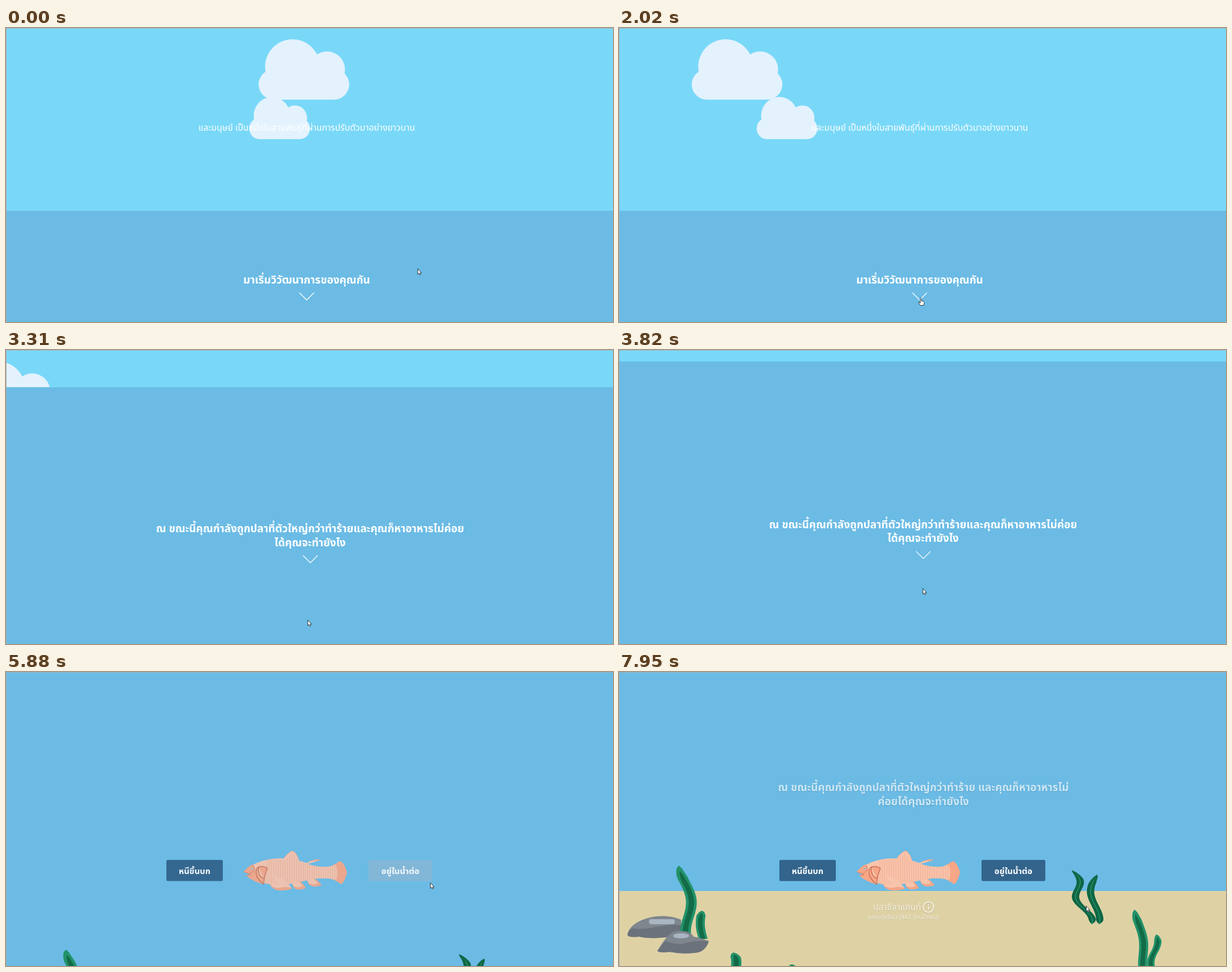
An HTML page for the animation above (8000 ms loop, 1075 px wide and 521 px high).

```html
<!DOCTYPE html>
<html lang="th">
<head>
<meta charset="utf-8">
<title>Evolution scroll story</title>
<style>
  html, body { margin: 0; width: 100%; height: 100%; overflow: hidden; background: #6bbbe5; }
  svg { display: block; width: 1075px; height: 521px; }
  text { font-family: "IBM Plex Sans Thai", "Noto Sans Thai", "Noto Sans", sans-serif; fill: #fff; text-anchor: middle; }
  .head { font-size: 19px; font-weight: 600; }
  .btn { font-size: 14.9px; font-weight: 600; }
  .chevron { fill: none; stroke: #fff; stroke-width: 1.3; }
  .shade { filter: drop-shadow(0 1px 1px #0003); }
</style>
</head>
<body>
<svg viewBox="0 0 1075 521">
  <defs>
    <g id="cloud" fill="#e3f2fd">
      <circle cx="60" cy="-58.5" r="48.5"/>
      <circle cx="121" cy="-53.5" r="32"/>
      <rect y="-54" width="160.5" height="54" rx="27"/>
    </g>
    <pattern id="scales" width="4" height="4" patternUnits="userSpaceOnUse">
      <path d="M3 0Q0 2 3 4" fill="none" stroke="#eda78b" stroke-width=".8"/>
    </pattern>
    <path id="chevron" class="chevron" d="M-13 0L0 13L13 0"/>
  </defs>

  <rect width="1075" height="521" fill="#79d8f8"/>
  <use id="big" href="#cloud"/>
  <use id="small" href="#cloud"/>
  <text x="532.5" y="182" font-size="15.6">และมนุษย์ เป็นหนึ่งในสายพันธุ์ที่ผ่านการปรับตัวมาอย่างยาวนาน</text>

  <rect id="sea" width="1075" height="1000" fill="#6bbbe5"/>
  <g id="title">
    <text class="head" x="532.5" y="453">มาเริ่มวิวัฒนาการของคุณกัน</text>
    <use href="#chevron" x="532.5" y="469"/>
  </g>

  <g id="bed">
    <rect y="405" width="1075" height="400" fill="#ded2a5"/>
    <g id="backRock">
      <path fill="#7f868e" d="M15 482C20 455 75 440 110 456V481Q70 493 35 486Q15 488 15 482Z"/>
      <path fill="#6b727b" d="M15 482Q17 474 24 471C50 477 80 461 110 466V481Q70 493 35 486Q15 488 15 482Z"/>
      <rect x="53" y="455" width="46" height="9" rx="4.5" fill="#a9b5c2"/>
    </g>
    <g id="weeds"></g>
    <g id="frontRock">
      <path fill="#7f868e" d="M68 511Q85 482 97 477Q125 473 132 486Q145 488 159 494Q154 510 140 514Q115 518 90 513Q70 515 68 511Z"/>
      <path fill="#6b727b" d="M68 511L82 494Q105 502 120 497T159 494Q154 510 140 514Q115 518 90 513Q70 515 68 511Z"/>
      <ellipse cx="110" cy="484.5" rx="14" ry="4.5" fill="#a9b5c2"/>
    </g>
  </g>

  <g id="fish">
    <g id="fins"></g>
    <path fill="#f7a686" d="M562 349Q580 343 591 335Q599 337 604 355Q600 372 594 376Q575 364 562 361Z"/>
    <path fill="#f9c4ac" stroke="#f7a686" d="M489 335Q500 318 508 317Q517 322 520 341Z"/>
    <path id="body" fill="#f9c4ac" d="M421 354C450 324 505 325 540 342Q570 349 583 341Q591 355 584 369Q565 361 525 371C490 381 445 378 425 360L433 359Z"/>
    <path fill="url(#scales)" d="M462 333Q500 328 540 342Q570 349 583 341Q591 355 584 369Q565 361 525 371Q490 380 457 376ZM494 333L508 319L518 339Z"/>
    <path fill="#f7a686" d="M421 354Q428 345 436 341Q444 348 445 363L456 376Q437 372 425 360L433 359Z"/>
    <path fill="none" stroke="#d17c60" d="M421 354L434 359L426 361M432 356Q442 355 438 342"/>
    <path fill="#f7a686" stroke="#cc7358" stroke-width="1.5" d="M446 346Q455 342 463 348Q458 358 456 376Q450 372 444 362Q441 351 446 346ZM447 346Q446 362 457 366"/>
    <circle cx="435.5" cy="348.5" r="3" fill="#fff" stroke="#cc7358"/>
    <circle cx="435.5" cy="348.5" r="1.2" fill="#654"/>
  </g>

  <g id="left">
    <rect x="284" y="333" width="100" height="37.5" rx="2.5" fill="#33648c"/>
    <text class="btn" x="334" y="357.5">หนีขึ้นบก</text>
  </g>
  <g id="right">
    <rect id="face" x="642" y="333" width="113" height="37.5" rx="2.5"/>
    <text class="btn" x="698.5" y="357.5">อยู่ในน้ำต่อ</text>
  </g>

  <g id="ask">
    <text class="head" x="538.5" y="272">ณ ขณะนี้คุณกำลังถูกปลาที่ตัวใหญ่กว่าทำร้ายและคุณก็หาอาหารไม่ค่อย</text>
    <text class="head" x="538.5" y="296.5">ได้คุณจะทำยังไง</text>
    <use href="#chevron" x="539" y="313"/>
  </g>
  <g id="again" class="shade">
    <text class="head" x="539" y="211">ณ ขณะนี้คุณกำลังถูกปลาที่ตัวใหญ่กว่าทำร้าย และคุณก็หาอาหารไม่</text>
    <text class="head" x="539" y="235.5">ค่อยได้คุณจะทำยังไง</text>
  </g>
  <g id="label" class="shade">
    <text x="492.5" y="422" font-size="15.4">ปลาซีลาแคนท์</text>
    <circle cx="548" cy="416.5" r="9.3" fill="none" stroke="#fff" stroke-width="2"/>
    <path d="M548 415v6M548 411v2" stroke="#fff" stroke-width="2"/>
    <text x="503.5" y="438" font-size="10.8">ยุคซูลลิเรียน (443 ล้านปีก่อน)</text>
  </g>

  <path d="M0 .5H1075M.5 0V521" stroke="#9fb2bd"/>
  <g id="cursor" fill="#fff" stroke="#222" stroke-width=".9" stroke-linejoin="round">
    <path id="arrow" d="M.5 .5V10.5L2.8 8.4L4.300 11.5L5.8 10.8L4.5 7.8H7Z"/>
    <path id="hand" d="M-.5 1.5Q.5 0 1.5 1.5V5.5L5.5 6.5Q6.5 7 6.5 8.5L5.5 13.5H-.5L-3.5 9Q-3.500 7.5-2 8L-.5 9.5Z"/>
  </g>
</svg>
<script>
  const LOOP = 8000;
  const el = id => document.getElementById(id);
  const clamp = p => Math.min(1, Math.max(0, p));
  const ramp = (t, from, to) => clamp((t - from) / (to - from));
  const smooth = p => p * p * (3 - 2 * p);
  const lerp = (a, b, p) => a + (b - a) * p;
  const move = (id, x, y, more = "") => el(id).setAttribute("transform", `translate(${x} ${y})${more}`);
  const fade = (id, a) => el(id).setAttribute("opacity", a);
  const path = (fill, d) => `<path fill="${fill}" d="${d}"/>`;

  // A ribbon that sways along its height; the tip tapers, and so can the foot.
  function ribbon(fill, w, { x0, y0, x1, y1, sway, waves, phase = 0, foot = false }, inset = 0) {
    const left = [], right = [], steps = 24;
    for (let i = 0; i <= steps; i++) {
      const p = lerp(inset, 1, i / steps), q = i / steps;
      const x = lerp(x0, x1, p) + sway * Math.sin(2 * Math.PI * (waves * p + phase));
      const half = w * Math.sqrt(Math.min(1, q * 6, foot ? (1 - q) * 12 : 1));
      const y = lerp(y0, y1, p).toFixed(1);
      left.push(`${(x - half).toFixed(1)} ${y}`);
      right.unshift(`${(x + half).toFixed(1)} ${y}`);
    }
    return path(fill, `M${left.concat(right).join("L")}Z`);
  }
  const weed = (w, shape) => ribbon("#22926a", w, shape) + ribbon("#136b47", w * .5, shape, .08);
  const kelp = shape => ribbon("#0f6644", 6.5, { ...shape, foot: true }) + ribbon("#2a9a6e", .7, shape, .05);

  el("weeds").innerHTML =
    weed(9.5, { x0: 114, y0: 360, x1: 126, y1: 482, sway: 8, waves: 1, phase: -.25 }) +
    weed(8, { x0: 147, y0: 440, x1: 149, y1: 490, sway: -4, waves: .5 }) +
    weed(8, { x0: 917, y0: 438, x1: 932, y1: 545, sway: 4, waves: 1, phase: -.25 }) +
    weed(6.5, { x0: 952, y0: 482, x1: 944, y1: 545, sway: 4, waves: 1 }) +
    weed(9, { x0: 203, y0: 514, x1: 212, y1: 560, sway: 2, waves: 1 }) +
    weed(7, { x0: 306, y0: 535, x1: 306, y1: 560, sway: 1, waves: 1 }) +
    kelp({ x0: 802, y0: 368, x1: 832, y1: 464, sway: 9, waves: 1.4 }) +
    kelp({ x0: 847, y0: 376, x1: 841, y1: 464, sway: -10, waves: .8 });

  // A leaf-shaped fin from root to tip with a paler core.
  function fin(x, y, dx, dy, w) {
    const leaf = (fill, k) => path(fill, `M${x} ${y}q${dx * .3 * k + w * k} ${dy * .5 * k - w * k} ${dx * k} ${dy * k}q${-dx * .7 * k - w * k} ${w * k} ${-dx * k} ${-dy * k}Z`);
    return leaf("#f7a686", 1) + leaf("#f9c4ac", .75);
  }
  el("fins").innerHTML =
    fin(527, 342, 31, -9, 9) + fin(466, 368, 41, 16, 11) +
    fin(507, 369, 24, 14, 9) + fin(533, 364, 26, 14, 8);
  el("fish").insertAdjacentHTML("beforeend", path("#f9c4ac", "M472 361Q494 365 505 382Q485 382 472 361Z"));

  // Pointer rests: time, x, y.
  const rests = [
    [0, 729, 426], [510, 580, 476], [1170, 534, 478], [3560, 534, 478],
    [4190, 543, 343], [4600, 543, 341], [4740, 575, 350], [5880, 751, 373], [6890, 827, 414],
  ];
  function pointer(t) {
    const i = rests.findIndex(r => r[0] > t);
    if (i < 0) return rests.at(-1).slice(1);
    const [a, b] = [rests[i - 1], rests[i]], p = ramp(t, a[0], b[0]);
    return [lerp(a[1], b[1], p), lerp(a[2], b[2], p)];
  }

  function draw(t) {
    move("big", 447.5 - t * .1577, 127);
    move("small", 431 - t * .0926, 197, " scale(.669 .7)");

    // The sea rises with a decaying scroll, then the question stays pinned for a while.
    const horizon = 372 * Math.exp(-Math.max(0, t - 2130) / 998) - 48;
    move("sea", 0, horizon);
    move("title", 0, horizon - 324);
    fade("title", 1 - ramp(t, 2150, 2650));

    const pinned = 51 - 34 * ramp(t, 3680, 4330) - 17 * ramp(t, 4600, 4740) - .43 * Math.max(0, t - 4740);
    move("ask", 0, pinned + Math.max(0, horizon - 66));
    fade("ask", ramp(t, 2400, 2900));

    move("bed", 0, 177.5 - 194.5 * smooth(ramp(t, 5250, 7250)));

    fade("fish", ramp(t, 4690, 6000));
    fade("left", ramp(t, 4740, 5940));
    fade("right", ramp(t, 4740, 5940));
    const hover = ramp(t, 5500, 5700) - ramp(t, 6020, 6500);
    el("face").setAttribute("fill", `rgb(${lerp(51, 133, hover)},${lerp(100, 183, hover)},${lerp(140, 215, hover)})`);

    fade("label", .65 * ramp(t, 7100, 7950));
    fade("again", .65 * ramp(t, 7450, 7950));

    move("cursor", ...pointer(t));
    const pointing = t > 900 && t < 2400;
    fade("hand", +pointing);
    fade("arrow", +!pointing);
  }

  const start = performance.now();
  function tick() {
    draw((performance.now() - start) % LOOP);
    requestAnimationFrame(tick);
  }
  tick();
</script>
</body>
</html>
```
